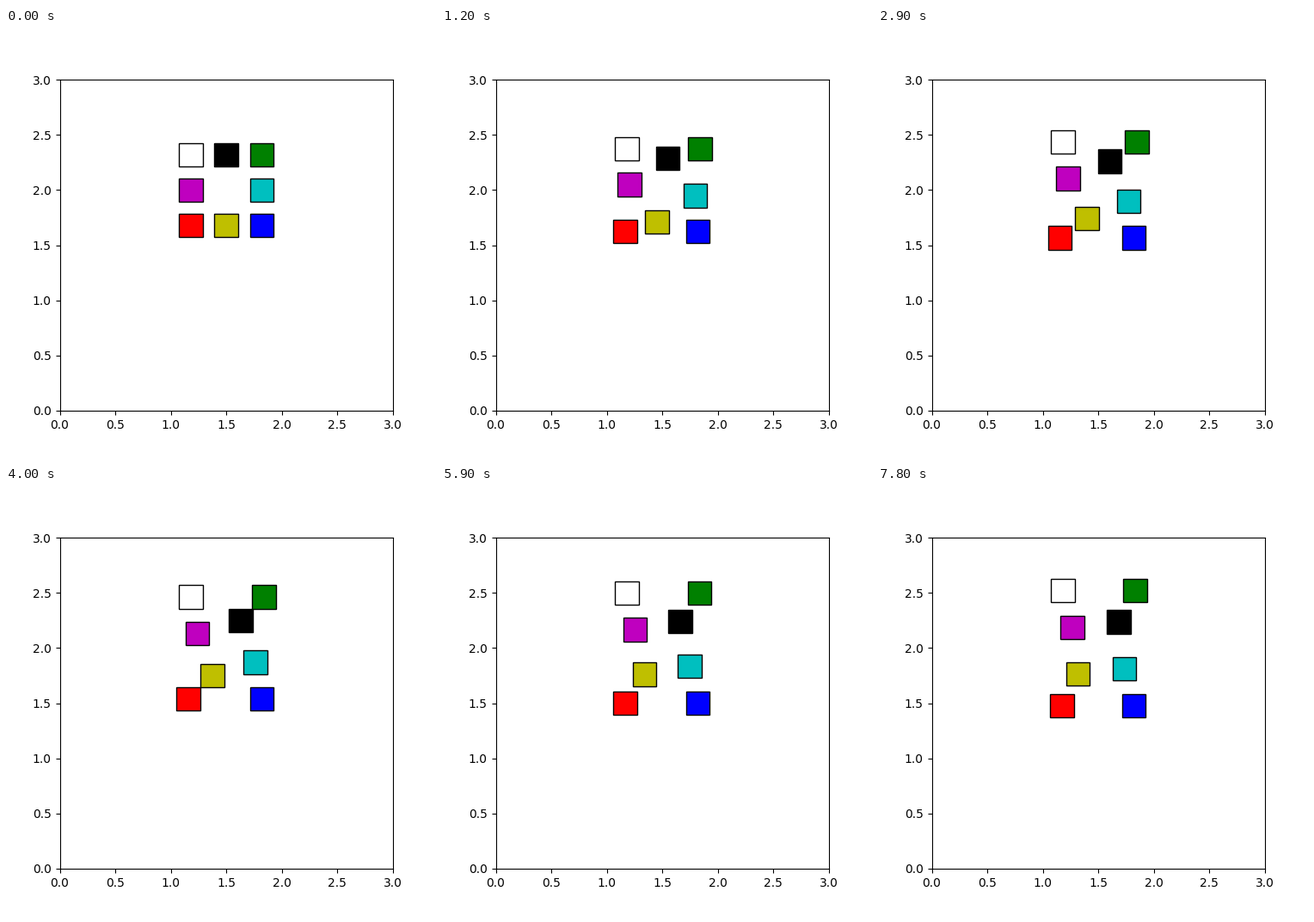
A matplotlib script for the animation above (8 s loop, 500 by 500 pixels).

```python
import numpy as np
import matplotlib.pyplot as plt
from matplotlib.animation import FuncAnimation
from matplotlib.patches import Rectangle

FRAMES, INTERVAL = 80, 100
CENTRE = np.array([1.5, 2.0])
STEP = 0.32
SIZE = STEP * 2 / 3


def settle(n, reach, tau=50):
    """Slow approach to a distance, in data units."""
    return reach * (1 - np.exp(-n / tau))


def swerve(n):
    """Steady drift outwards, then a slow return."""
    return min(0.0014 * n, 0.0503 * np.exp(-n / 45))


# Mirrored pairs: colours, grid cell of the first square, its drift
PAIRS = [
    ("w", "b", (-1, 1), lambda n: (0, settle(n, 0.257))),
    ("k", "y", (0, 1), lambda n: (settle(n, 0.232), -settle(n, 0.09, 27))),
    ("g", "r", (1, 1), lambda n: (swerve(n), settle(n, 0.257))),
    ("m", "c", (-1, 0), lambda n: (settle(n, 0.109), settle(n, 0.238))),
]

fig, ax = plt.subplots(figsize=(5, 5), dpi=100)
fig.subplots_adjust(left=0.125, right=0.9, bottom=0.11, top=0.88)
ax.set(xlim=(0, 3), ylim=(0, 3))


def square(color):
    return ax.add_patch(Rectangle((0, 0), SIZE, SIZE, fc=color, ec="k", lw=1))


squares = [(square(a), square(b)) for a, b, *_ in PAIRS]


def update(n):
    n = min(n, FRAMES - 2)  # the last step rests
    for pair, (*_, cell, drift) in zip(squares, PAIRS):
        offset = STEP * np.array(cell) + drift(n)
        for sq, sign in zip(pair, (1, -1)):
            sq.set_xy(CENTRE + sign * offset - SIZE / 2)
    return [sq for pair in squares for sq in pair]


anim = FuncAnimation(fig, update, frames=FRAMES, interval=INTERVAL,
                     repeat=True, repeat_delay=0)
plt.show()
```
